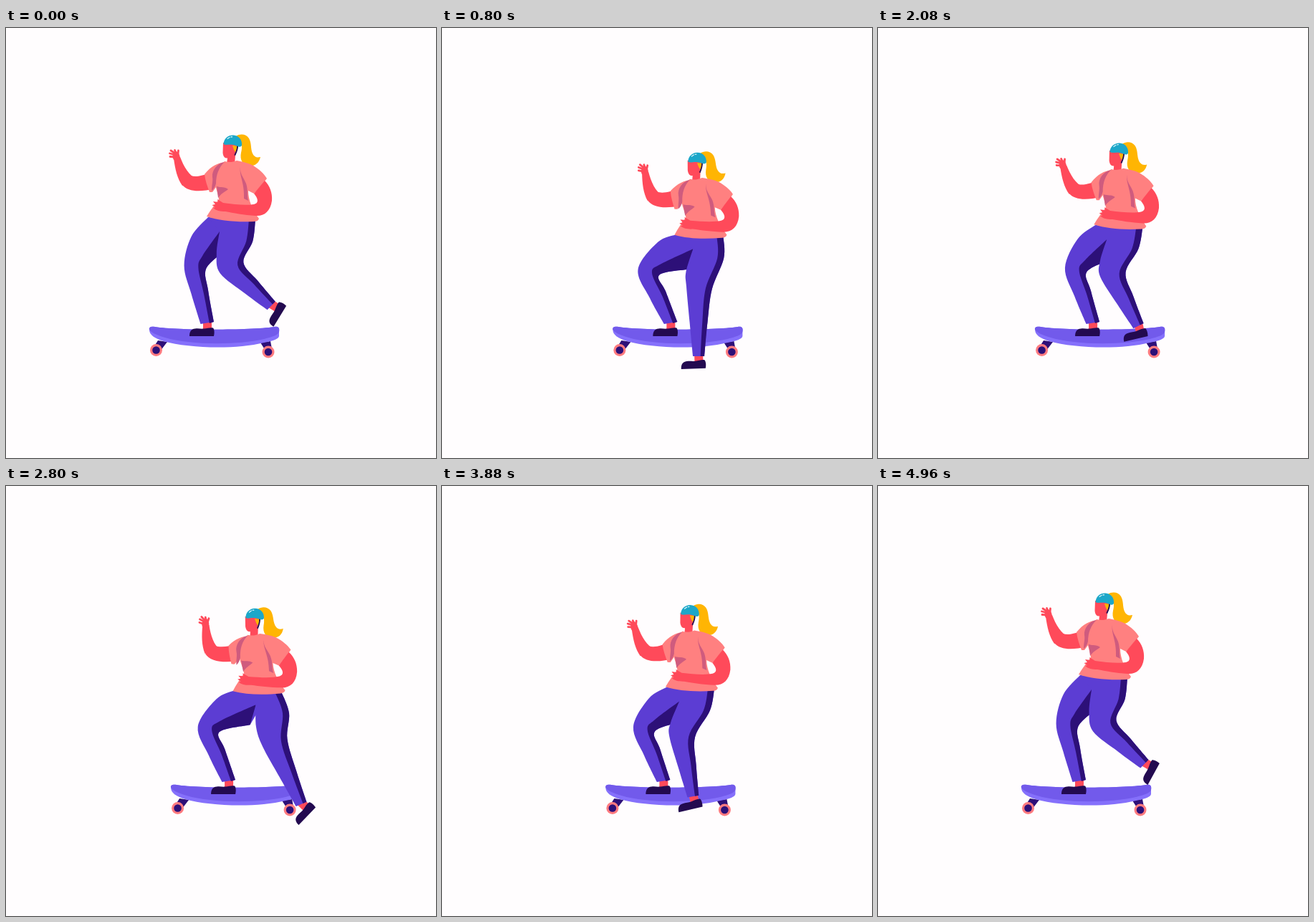
An HTML page with a canvas that plays this animation: 600x600 px, repeating every 5 s.

```html
<!DOCTYPE html>
<html lang="en">
<head>
<meta charset="utf-8">
<title>Skateboarder</title>
<style>
html, body { margin: 0; width: 100%; height: 100%; overflow: hidden; background: #fffdfe; }
canvas { display: block; width: 600px; height: 600px; }
</style>
</head>
<body>
<canvas id="stage" width="600" height="600"></canvas>
<script>
const ctx = document.getElementById('stage').getContext('2d');
const PUSH = 5000 / 3;
const LEG = 168;
const C = {
  bg: '#fffdfe', skin: '#ff4a5a', shirt: '#ff8080', fold: '#cf5b7e', hair: '#ffb503',
  helmet: '#1ca7c9', trousers: '#5c3dd3', dark: '#2d1078', shoe: '#230a50',
  deck: '#725aeb', rim: '#8570fb', wheel: '#ff7b80'
};

// Path of the pushing foot over one push: phase, x, y, tilt.
const STEPS = [
  [-.012, 371, 385.5, -60], [.248, 363.5, 413.5, -13], [.328, 350.5, 431, -13],
  [.48, 358, 456, -2], [.68, 412, 442, -46], [.768, 397.5, 420.5, -63]
];

const clamp = u => Math.min(1, Math.max(0, u));
const sine = u => (1 - Math.cos(Math.PI * clamp(u))) / 2;
const cubic = u => (u = clamp(u), u < .5 ? 4 * u ** 3 : 1 - 4 * (1 - u) ** 3);

// The roll carries board and body; the kick leads arm, lean and rear hip.
const rollAt = p => p < .5 ? sine(p / .5) : 1 - cubic((p - .5) / .476);
const kickAt = p => p < .68 ? sine((p - .25) / .43) : 1 - sine((p - .68) / .296);

function footAt(p) {
  const n = STEPS.length;
  const step = i => {
    const lap = Math.floor(i / n), [t, ...rest] = STEPS[i - lap * n];
    return [t + lap, ...rest];
  };
  let i = 0;
  while (step(i + 1)[0] <= p) i++;
  const [a, b, c, d] = [-1, 0, 1, 2].map(k => step(i + k));
  const h = c[0] - b[0], u = (p - b[0]) / h, w = u * u * (3 - 2 * u);
  return [1, 2, 3].map(k => {
    const m0 = (c[k] - a[k]) / (c[0] - a[0]), m1 = (d[k] - b[k]) / (d[0] - b[0]);
    return b[k] + (c[k] - b[k]) * w + h * u * (1 - u) * ((1 - u) * m0 - u * m1);
  });
}

const add = ([x, y], dx, dy) => [x + dx, y + dy];

// Point at fraction t from a to b, moved sideways by w.
function side(a, b, t, w = 0) {
  const dx = b[0] - a[0], dy = b[1] - a[1], d = Math.hypot(dx, dy);
  return [a[0] + dx * t - dy / d * w, a[1] + dy * t + dx / d * w];
}

// Returns a function giving the knee, or a point w beside it; a short reach bends it more.
function bendKnee(hip, ankle, t, strength) {
  const reach = Math.hypot(ankle[0] - hip[0], ankle[1] - hip[1]);
  return (w = 0) => side(hip, ankle, t, strength * (LEG - reach) + w);
}

// Smooth curve through the points, continuing the current path.
function curve(pts) {
  ctx.lineTo(...pts[0]);
  for (let i = 0; i < pts.length - 1; i++) {
    const a = pts[i - 1] || pts[i], b = pts[i], c = pts[i + 1], d = pts[i + 2] || c;
    ctx.bezierCurveTo(b[0] + (c[0] - a[0]) / 6, b[1] + (c[1] - a[1]) / 6,
      c[0] - (d[0] - b[0]) / 6, c[1] - (d[1] - b[1]) / 6, c[0], c[1]);
  }
}

function shape(color, ...edges) {
  ctx.beginPath();
  edges.forEach(curve);
  ctx.closePath();
  ctx.fillStyle = color;
  ctx.fill();
}

function fill(color, d) {
  ctx.fillStyle = color;
  ctx.fill(new Path2D(d));
}

function line(color, width, d) {
  ctx.strokeStyle = color;
  ctx.lineWidth = width;
  ctx.lineCap = ctx.lineJoin = 'round';
  ctx.stroke(new Path2D(d));
}

function disc(color, x, y, r) {
  ctx.fillStyle = color;
  ctx.beginPath();
  ctx.arc(x, y, r, 0, 7);
  ctx.fill();
}

function at(x, y, degrees, draw) {
  ctx.save();
  ctx.translate(x, y);
  ctx.rotate(degrees * Math.PI / 180);
  draw();
  ctx.restore();
}

// Turns the drawing about a joint that stays in place.
function pivot(x, y, degrees, draw) {
  at(x, y, degrees, () => {
    ctx.translate(-x, -y);
    draw();
  });
}

function board() {
  fill(C.dark, 'M212 436L225 438L215 451L205 447ZM355 439L369 437L372 453L362 450Z');
  fill(C.rim, 'M200 421C199 417 203 416 208 417C240 422 340 422 374 417C380 416 382 418 381 424L381 430C380 434 374 436 360 439C320 449 255 447 220 437C207 433 200 428 200 421Z');
  fill(C.deck, 'M200 421C199 417 203 416 208 417C240 422 340 422 374 417C380 416 382 418 381 424C380 428 372 431 360 434C320 443 255 442 222 432C208 428 202 424 200 421Z');
  for (const [x, y] of [[209.5, 449.5], [366, 452]]) {
    disc(C.wheel, x, y, 8.5);
    disc(C.dark, x, y, 5.3);
  }
}

function shoe() {
  fill(C.skin, 'M-6 -2H6V10H-6Z');
  fill(C.shoe, 'M-25 19C-25 13 -23 9 -17 8.5C-12 8 -9 9 -5 8.5C0 8 4 6.5 8 7.5C10 10 10 15 9 19Z');
}

function frontLeg(pelvis, crotch, boardX) {
  const hip = add(pelvis, -15, 14), ankle = [281 + boardX, 411];
  const bend = bendKnee(hip, ankle, .44, .8), knee = bend();
  const inner = [add(ankle, 9, -1), side(knee, ankle, .45, -11), bend(-16), add(hip, 4, 32)];
  const outer = [add(pelvis, -33, -2), side(hip, knee, .5, 28), bend(15),
    side(knee, ankle, .45, 13), add(ankle, -9.5, 2)];
  const shade = [crotch, side(hip, knee, .7), bend(-5), side(knee, ankle, .5, -4), add(ankle, 3, 1)];
  at(ankle[0], 411, 0, shoe);
  shape(C.trousers, outer, inner, [add(pelvis, 10, 10)]);
  shape(C.dark, shade, inner);
}

function backLeg(pelvis, crotch, kick, [x, y, tilt]) {
  const hip = add(pelvis, 7 + 11 * kick, 19 - 3 * kick), ankle = [x, y + 2];
  const bend = bendKnee(hip, ankle, .37, .5), knee = bend();
  const left = [crotch, add(side(hip, knee, .6), -24, 0), bend(18),
    side(knee, ankle, .5, 13), side(knee, ankle, 1, 8)];
  const right = inset => [add(pelvis, 33 - inset, 1), add(side(hip, knee, .25), 24 - inset, 0),
    bend(inset - 18), side(knee, ankle, .5, inset * .8 - 12), side(knee, ankle, 1, inset * .6 - 8)];
  at(x, y, tilt, shoe);
  shape(C.trousers, [add(pelvis, -33, -2)], left, right(0).reverse());
  shape(C.dark, right(9), right(0).reverse());
}

function raisedArm(kick) {
  pivot(304, 205, 10 * kick, () => {
    pivot(256, 215, 6 * kick, () => {
      fill(C.skin, 'M267 211C255 206 248 193 243 180L234 182C236 197 239 210 246 220Z');
      fill(C.skin, 'M234 184C231 179 233 173 237 172C241 173 243 178 243 183Z');
      line(C.skin, 2.8, 'M236 180L229 179.5M236 177L228.5 175M236 175L230 171M238 176L235.5 170.5M240 176L240.5 171');
    });
    fill(C.skin, 'M290 200C277 205 266 209 258 206L246 219C254 229 272 229 291 224Z');
    fill(C.shirt, 'M307 187C295 188 286 193 277 204C278 213 281 221 284 229L288 229C291 225 295 219 301 211Z');
  });
}

function head() {
  fill(C.hair, 'M321 151C327 147 335 148 339 154C343 161 341 168 344 175C347 181 351 181 355 180C353 189 347 193 339 192C330 191 326 184 328 174C330 166 329 160 325 157Z');
  fill(C.skin, 'M303 160L302.5 174C303 179 305 182 309 181.5L308 190L319 190L320 178L324 163Z');
  fill(C.hair, 'M316 164L324 165L321 175L318 170Z');
  line(C.shoe, 1.8, 'M323 165C323 170 321 174 319.5 177');
  fill(C.helmet, 'M303.5 162C304 154 310 149.5 317 149.5C325 150 330 156 329 164C326 168 323 164 317 163C311 162 307 164 303.5 162Z');
  line('#d9f3f8', 1.3, 'M309 154.5L312 152.5M314 152L315.5 151.8');
}

function shirt() {
  fill(C.shirt, 'M305 186C311 188 317 187 322 185C332 187 340 189 345 192C353 197 360 203 364 210C358 218 352 225 346 231L338 227C338 240 344 254 353 266C352 269 349 270 346 270C321 271 298 269 280 263C285 254 292 246 297 239C296 231 293 225 292 218C290 208 295 196 305 186Z');
  fill(C.fold, 'M305 187C294 189 287 199 288 208C289 214 287 219 287 227C290 225 292 221 293 217C293 205 297 194 305 187Z');
  fill(C.fold, 'M294 221C300 223 305 221 310 225C305 229 300 231 296 237Z');
  fill(C.fold, 'M327 194C325 206 333 215 332 238L338 241C336 232 338 226 335 217C332 209 326 204 327 194Z');
}

function restingArm() {
  fill(C.skin, 'M346 231L361 213C368 220 372 230 371 241C369 256 360 263 348 262C332 261 317 258 306 256C299 256 293 255 289 251L292 250L287.5 247L292 246L289 242L296 243L295 239L303 244C318 246 335 248 346 246C354 244 351 237 346 231Z');
}

function frame(now) {
  const p = now / PUSH % 1;
  const roll = rollAt(p), kick = kickAt(p), boardX = 38.5 * roll;
  const pelvis = [315 + 43 * roll + 3 * kick, 266 + 22 * roll + 4 * kick];
  const crotch = add(pelvis, 14 * kick - 17, 18);
  ctx.fillStyle = C.bg;
  ctx.fillRect(0, 0, 600, 600);
  at(boardX, 0, 0, board);
  frontLeg(pelvis, crotch, boardX);
  backLeg(pelvis, crotch, kick, footAt(p));
  at(...pelvis, -1.5 * roll - 2 * kick, () => {
    ctx.translate(-315, -266);
    raisedArm(kick);
    head();
    shirt();
    restingArm();
  });
}

const begin = performance.now();
function tick() {
  frame(performance.now() - begin);
  requestAnimationFrame(tick);
}
tick();
</script>
</body>
</html>
```
